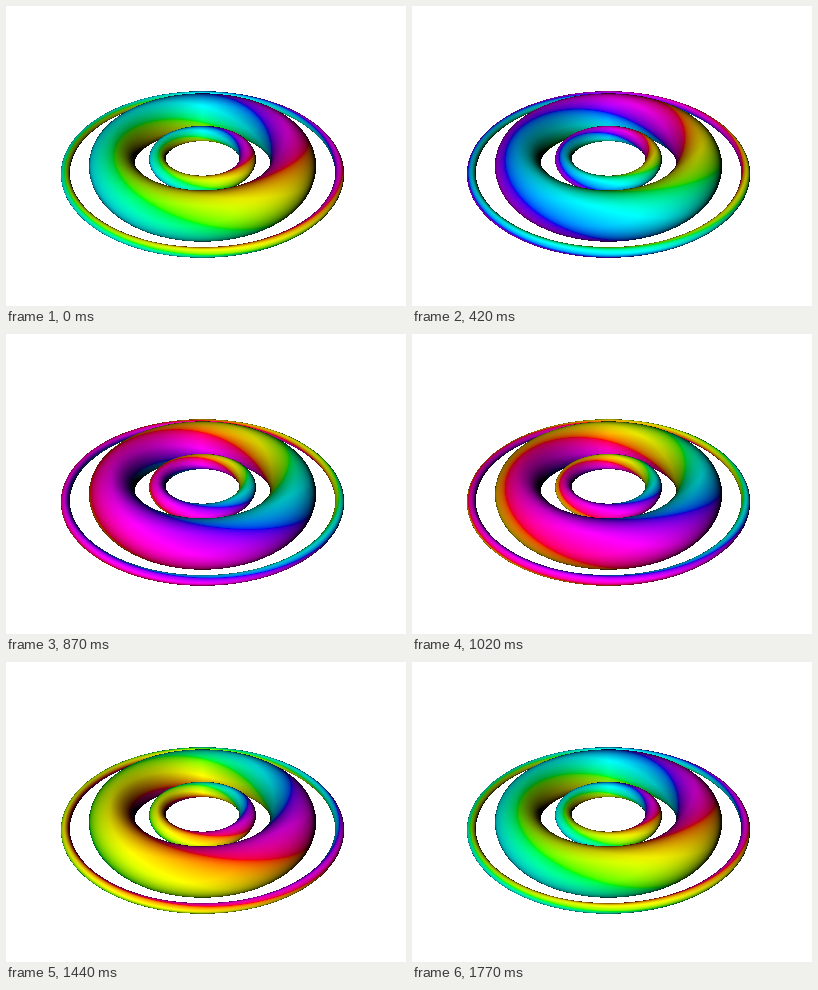
These frames come from a looping animation (400x300 px, 1.8 s). An HTML page with a canvas:

```html
<!DOCTYPE html>
<html lang="en">
<head>
<meta charset="utf-8">
<title>Three colour-cycling tori</title>
<style>
  html, body { margin: 0; width: 100%; height: 100%; overflow: hidden; background: #fff; }
  canvas { display: block; }
</style>
</head>
<body>
<canvas id="stage" width="400" height="300"></canvas>
<script>
const LOOP = 1800, STEP = 30;
const BASE_HUE = 38, HUE_SWAY = 9, GAMMA = 2.2;
const LIGHT_LEFT = 0.25;
const CENTER = { x: 196.5, y: 151.2 };
const DISTANCE = 535;
const SIN = 0.563, COS = Math.sqrt(1 - SIN * SIN);
const BOX = { x: 52, y: 82, w: 290, h: 174 };
const TORI = [
  { R: 134.1, r: 4.2 },
  { R: 89.7, r: 22 },
  { R: 45, r: 8.2 }
];

const ctx = document.getElementById('stage').getContext('2d');
const image = ctx.createImageData(BOX.w, BOX.h);
const samples = [];

function nearest(x, y, z) {
  const rho = Math.hypot(x, y);
  let best = null, gap = Infinity;
  for (const torus of TORI) {
    const d = Math.hypot(rho - torus.R, z) - torus.r;
    if (d < gap) { gap = d; best = torus; }
  }
  return { gap, torus: best };
}

// World axes: x right, y away from the viewer, z up.
function trace(sx, sy) {
  const length = Math.hypot(sx, sy, DISTANCE);
  const dx = sx / length;
  const dy = (sy * SIN + DISTANCE * COS) / length;
  const dz = (sy * COS - DISTANCE * SIN) / length;
  let t = 350;
  for (let i = 0; i < 240 && t < 740; i++) {
    const x = dx * t;
    const y = dy * t - DISTANCE * COS;
    const z = dz * t + DISTANCE * SIN;
    const { gap, torus } = nearest(x, y, z);
    if (gap < 0.02) return surface(x, y, z, torus, dx, dy, dz);
    t += gap;
  }
  return null;
}

function surface(x, y, z, { R, r }, dx, dy, dz) {
  const theta = Math.atan2(y, x);
  const phi = Math.atan2(z, Math.hypot(x, y) - R);
  const out = Math.cos(phi);
  const nx = out * Math.cos(theta);
  const ny = out * Math.sin(theta);
  const nz = Math.sin(phi);

  // Conformal angle around the tube gives the twisted colour bands.
  const twist = 2 * Math.atan(Math.sqrt((R - r) / (R + r)) * Math.tan(phi / 2));
  const hue = BASE_HUE - (theta + twist) * 180 / Math.PI - HUE_SWAY * Math.sin(theta);

  const facing = Math.max(0, -(nx * dx + ny * dy + nz * dz));
  const lit = Math.max(0, facing - LIGHT_LEFT * nx * Math.min(1, facing * 4));
  const inner = Math.max(0, -out) * Math.abs(Math.cos(theta));
  const value = Math.min(1, 1.05 * Math.pow(lit, 0.65)) * (1 - 0.35 * inner);
  return { hue, value: 255 * value };
}

function channel(hue, offset) {
  const k = (((hue / 60 + offset) % 6) + 6) % 6;
  return Math.pow(1 - Math.max(0, Math.min(k, 4 - k, 1)), 1 / GAMMA);
}

function build() {
  image.data.fill(255);
  for (let row = 0; row < BOX.h; row++) {
    for (let col = 0; col < BOX.w; col++) {
      const sx = BOX.x + col + 0.5 - CENTER.x;
      const sy = CENTER.y - (BOX.y + row + 0.5);
      const hit = trace(sx, sy);
      if (hit) samples.push({ index: 4 * (row * BOX.w + col), ...hit });
    }
  }
}

function draw(time) {
  const shift = Math.floor((time % LOOP) / STEP) * STEP / LOOP * 360;
  const data = image.data;
  for (const { index, hue, value } of samples) {
    const h = hue + shift;
    data[index] = value * channel(h, 5);
    data[index + 1] = value * channel(h, 3);
    data[index + 2] = value * channel(h, 1);
  }
  ctx.putImageData(image, BOX.x, BOX.y);
}

function tick() {
  draw(performance.now() - start);
  requestAnimationFrame(tick);
}

build();
const start = performance.now();
draw(0);
requestAnimationFrame(tick);
</script>
</body>
</html>
```
